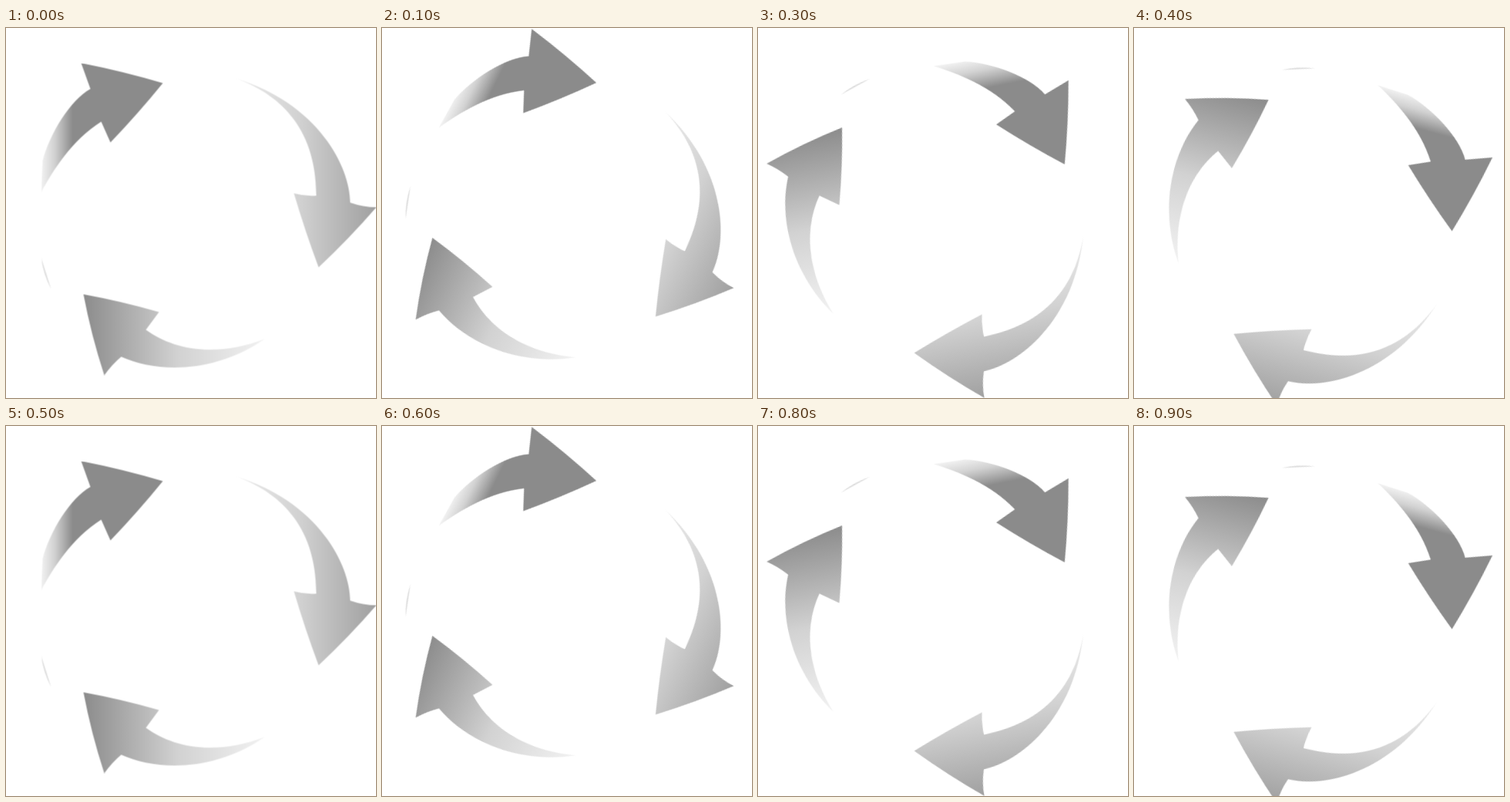
An HTML page without scripts for the animation above (1 s loop, 480 px wide and 480 px high).

```html
<!DOCTYPE html>
<html lang="en">
<head>
<meta charset="utf-8">
<title>Turning arrows</title>
<style>
  html, body { margin: 0; width: 100%; height: 100%; overflow: hidden; background: #fff; }
  svg { display: block; width: 100%; height: 100%; }
  #ring { animation: turn 500ms step-end infinite; }

  /* Five held poses; the pivot drifts a little as the ring turns. */
  @keyframes turn {
    0%   { transform: translate(236.5px, 242.5px) rotate(0deg); }
    20%  { transform: translate(232.8px, 239.2px) rotate(26deg); }
    40%  { transform: translate(233.5px, 238.6px) rotate(52.4deg); }
    60%  { transform: translate(236.5px, 242.5px) rotate(78.8deg); }
    80%  { transform: translate(238.8px, 251.2px) rotate(105deg); }
    100% { transform: translate(236.5px, 242.5px) rotate(0deg); }
  }
</style>
</head>
<body>
<svg viewBox="0 0 480 480">
  <defs>
    <linearGradient id="dark" gradientUnits="userSpaceOnUse" x1="43" y1="0" x2="86" y2="0">
      <stop offset="0" stop-color="#f6f6f6"/>
      <stop offset=".45" stop-color="#d2d2d2"/>
      <stop offset="1" stop-color="#8b8b8b"/>
    </linearGradient>
    <linearGradient id="pale" gradientUnits="userSpaceOnUse" x1="298" y1="0" x2="480" y2="0">
      <stop offset="0" stop-color="#ececec"/>
      <stop offset=".45" stop-color="#d2d2d2"/>
      <stop offset=".72" stop-color="#b9b9b9"/>
      <stop offset="1" stop-color="#a0a0a0"/>
    </linearGradient>
    <linearGradient id="mid" gradientUnits="userSpaceOnUse" x1="100" y1="0" x2="335" y2="0">
      <stop offset="0" stop-color="#8c8c8c"/>
      <stop offset=".33" stop-color="#b8b8b8"/>
      <stop offset=".52" stop-color="#d2d2d2"/>
      <stop offset="1" stop-color="#f2f2f2"/>
    </linearGradient>
  </defs>
  <g id="ring">
    <g transform="translate(-236 -242)">
      <path fill="url(#dark)" d="M203 71Q150.500 55.500 97 45L109 78.500C83 93 56 137 47 172L45 213C60 185 85 145 123 121L135 148Q170.500 111 203 71Z"/>
      <path fill="url(#pale)" d="M405 310Q387.500 263 373 214Q388 218 402 217C402 125 350 84 298 65C405 98 446 180 446 226Q463 232 480 232Q444.500 273 405 310Z"/>
      <path fill="url(#mid)" d="M100 345Q149.500 354 198 368L181 391C215 416 270 428 335 403C270 448 195 447 149 426Q137 436 127 450Q110 398 100 345Z"/>
      <path fill="#dedede" d="M45 297L58 338Q48 320 45 297Z"/>
    </g>
  </g>
</svg>
</body>
</html>
```
